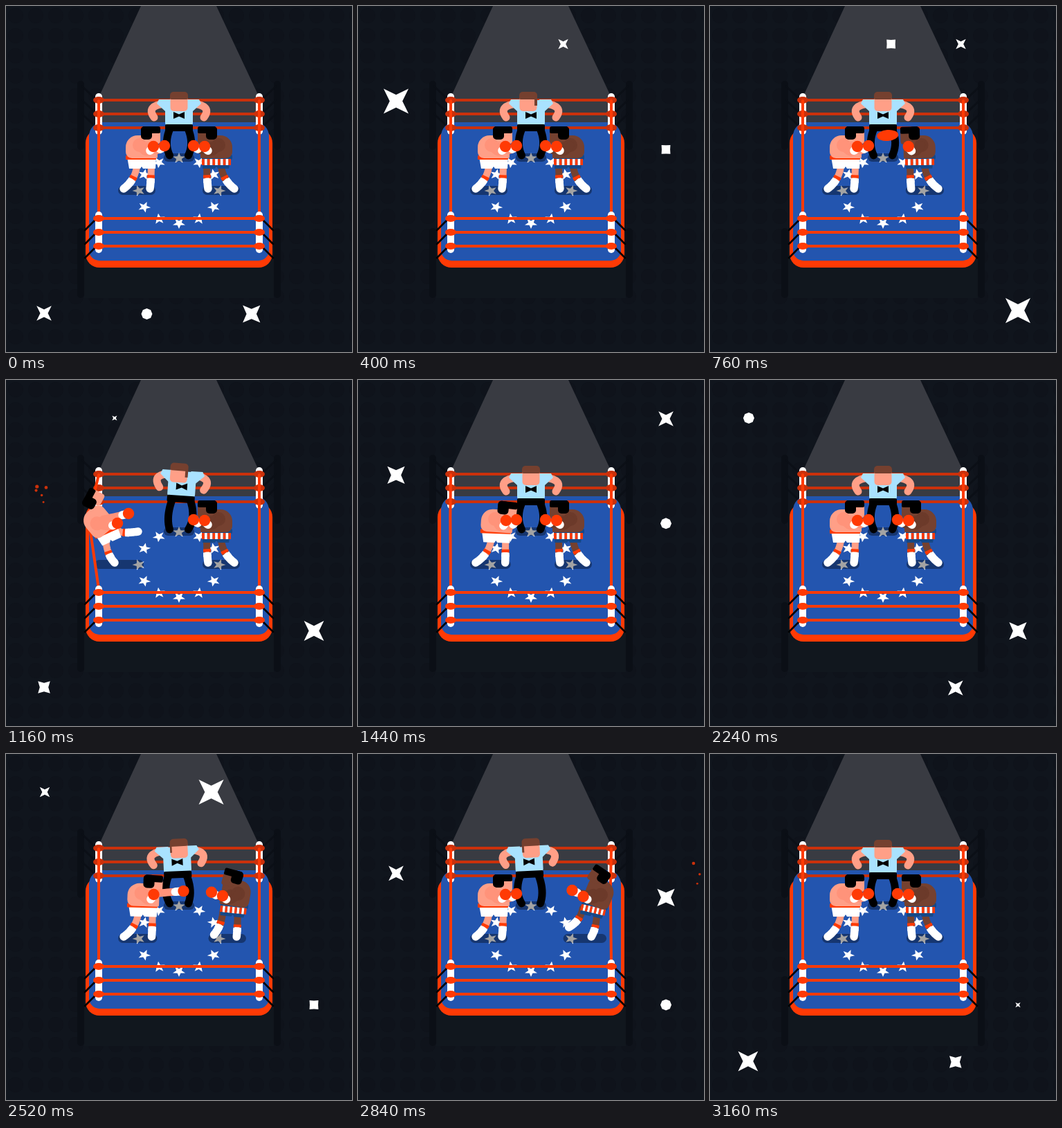
Recreate the animation shown at these times as an HTML page with a canvas. Size 500 by 500 pixels, loop 3.2 s.

```html
<!DOCTYPE html>
<html lang="en">
<head>
<meta charset="utf-8">
<title>Boxing ring</title>
<style>
html, body { margin: 0; width: 100%; height: 100%; overflow: hidden; background: #10151d; }
canvas { display: block; width: 500px; height: 500px; }
</style>
</head>
<body>
<canvas id="stage" width="500" height="500"></canvas>
<script>
const c = document.getElementById('stage').getContext('2d');
const LOOP = 3200, HALF = LOOP / 2, STEP = 40, RAD = Math.PI / 180;
const RED = '#ff3a05', DARK_RED = '#cb310b', BLACK = '#000', WHITE = '#fff';
const SHIRT = '#a9e2ff', DARK = '#0b0f16', SHADE = 'rgba(0,0,0,.36)';
const lerp = (a, b, k) => a + (b - a) * k;
// Eased 0 to 1 between two times
function ramp(t, from, to) {
  const k = Math.min(1, Math.max(0, (t - from) / (to - from)));
  return k * k * (3 - 2 * k);
}
const pulse = (t, a, b, d, e) => ramp(t, a, b) - ramp(t, d, e);

// ---------- drawing helpers ----------
function box(x, y, w, h, r, fill) {
  c.fillStyle = fill;
  c.beginPath();
  c.roundRect(x, y, w, h, r);
  c.fill();
}
function oval(x, y, rx, ry, fill, turn = 0) {
  c.fillStyle = fill;
  c.beginPath();
  c.ellipse(x, y, rx, ry, turn, 0, 7);
  c.fill();
}
function line(points, width, color, cap = 'round') {
  c.strokeStyle = color;
  c.lineWidth = width;
  c.lineCap = cap;
  c.lineJoin = 'round';
  c.beginPath();
  points.forEach(p => c.lineTo(...p));
  c.stroke();
}
function poly(points, fill) {
  c.fillStyle = fill;
  c.beginPath();
  points.forEach(p => c.lineTo(...p));
  c.fill();
}
function star(x, y, tips, outer, inner, turn, squash = 1) {
  const points = [];
  for (let i = 0; i < tips * 2; i++) {
    const a = turn + i * Math.PI / tips, r = i % 2 ? inner : outer;
    points.push([x + r * Math.cos(a), y + r * Math.sin(a) * squash]);
  }
  poly(points, WHITE);
}
// Part of a quadratic curve, from k0 to k1
function curve(p, q, r, k0, k1, width, color, cap) {
  const points = [];
  for (let i = 0; i <= 10; i++) {
    const k = lerp(k0, k1, i / 10);
    points.push([0, 1].map(n => lerp(lerp(p[n], q[n], k), lerp(q[n], r[n], k), k)));
  }
  line(points, width, color, cap);
}
function placed(x, y, degrees, draw) {
  c.save();
  c.translate(x, y);
  c.rotate(degrees * RAD);
  draw();
  c.restore();
}
function around(x, y, dx, dy, degrees) {
  const s = Math.sin(degrees * RAD), k = Math.cos(degrees * RAD);
  return [x + dx * k - dy * s, y + dx * s + dy * k];
}
function mirrored(draw) {
  c.save();
  c.translate(500, 0);
  c.scale(-1, 1);
  draw();
  c.restore();
}
function bothSides(draw) {
  draw();
  mirrored(draw);
}

// ---------- boxers, described as seen in the left corner ----------
// Each is hit in the first half of its own time u and punches in the second.
const pale = { skin: '#ff9f87', arm: '#ff937a', shorts: WHITE };
const brown = { skin: '#754130', arm: '#6c3a2a', shorts: '#164887', striped: true };

function pose(u) {
  const back = pulse(u, 800, 1040, 1160, 1400), back2 = back * back;
  const punch = pulse(u, 2340, 2400, 2400, 2640);
  const lift = pulse(u, 2280, 2350, 2400, 2580);
  const lean = punch + pulse(u, 1280, 1400, 1420, 1560);
  return {
    hip: [196 - 50 * back + 4 * lean, 220],
    tilt: 4 * lean - 40 * back2,
    width: 46 - 8 * back,
    height: 33 + 8 * Math.sqrt(back),
    head: [210 - 62 * back - 22 * back2 + 7 * lean, 186 - 14 * back + 2 * lean],
    headTilt: 7 * lean - 62 * back2,
    rearGlove: [213 - 52 * back + lean, 203 + 4 * back],
    leadGlove: [229 - 52 * back + 55 * punch, 202 - 9 * back2 - 15 * lift],
    rearFoot: [170 - 13 * back2, 264],
    leadFoot: [208 - 17 * back + 5 * lean, 264 - 45 * back2 * back2],
    smear: u > 2340 && u < 2400
  };
}
function boxerShadow(u) {
  const { hip, rearFoot, leadFoot } = pose(u);
  const left = Math.min(rearFoot[0] - 8, hip[0] - 18);
  box(left, 260, leadFoot[0] + 8 - left, 13, 6.5, SHADE);
}
function leg(hip, foot, skin) {
  const knee = [hip[0] * .85 + foot[0] * .15, (hip[1] + foot[1]) / 2 + 4];
  curve(hip, knee, foot, 0, .6, 10, skin);
  curve(hip, knee, foot, .52, .7, 11.5, WHITE, 'butt');
  curve(hip, knee, foot, .65, 1, 11.5, WHITE);
  curve(hip, knee, foot, .38, .5, 11, RED, 'butt');
}
function arm(from, glove, skin) {
  const reach = Math.hypot(glove[0] - from[0], glove[1] - from[1]);
  const elbow = [(from[0] + glove[0]) / 2, (from[1] + glove[1]) / 2 + Math.max(0, 38 - reach)];
  curve(from, elbow, glove, 0, .75, 11, skin);
  curve(from, elbow, glove, .76, .9, 12, WHITE);
  oval(...glove, 8.2, 8.2, RED);
}
function shortsOn(half, look) {
  poly([[-half, -2], [half, -2], [half - 1, 15], [2, 15], [0, 12], [-2, 15], [3 - half, 15]], look.shorts);
  if (look.striped) {
    box(-half - 2, -5, half * 2 + 2, 7, 2, look.shorts);
    const w = half * 2 / 11;
    for (let i = 0; i < 11; i++) box(-half + i * w, 1, w, 9, 0, i % 2 ? WHITE : RED);
  } else {
    box(-half - 2, -4, half * 2 + 2, 6, 1, RED);
  }
}
function boxer(u, look) {
  const p = pose(u), hipTilt = p.tilt * .6, w = p.width;
  leg(around(...p.hip, -7, 12, hipTilt), p.rearFoot, look.skin);
  leg(around(...p.hip, 14, 9, p.tilt), p.leadFoot, look.skin);
  placed(...p.hip, hipTilt, () => shortsOn(w / 2 - 2, look));
  placed(...p.hip, p.tilt, () => box(-w / 2, -p.height, w, p.height, [17, 12, 2, 9], look.skin));
  placed(...p.head, p.headTilt, () => {
    box(-5, -7, 18, 20, 4, look.skin);
    box(-15, -12, 28, 10, [5, 3, 2, 2], BLACK);
    box(-15, -12, 16, 19, 5, BLACK);
  });
  if (p.smear) oval(...p.leadGlove, 15.5, 8, RED, .08);
  else arm(around(...p.hip, 8, -18, p.tilt), p.leadGlove, look.arm);
  const shoulder = around(...p.hip, -3, -19, p.tilt);
  oval(...shoulder, 10, 10, look.arm);
  arm(shoulder, p.rearGlove, look.arm);
}

// Drops thrown off when a boxer lands in the ropes
function drops(u) {
  const k = (u - 1160) / STEP, spread = 1 + k * .2;
  if (k < -2 || k > 4) return;
  for (let i = 0; i < 5; i++) {
    const r = 2.6 - i * .28;
    oval(50 - 23 * k + 8 * Math.cos(i * 2.4 + 4) * spread, 154 + k + i * i * 1.4 * spread, r, r, DARK_RED);
  }
}
function sideRope(u) {
  const late = Math.max(0, u - 1160);
  const push = 15 * ramp(u, 1000, 1080) * Math.exp(-late / 90) * Math.cos(late / 45);
  line([[134, 137], [134 - push, 198], [134, 302], [134, 347]], 4, RED);
}

// ---------- referee: glances at one boxer, then dodges the punch ----------
function referee(t) {
  const side = t < HALF ? 1 : -1, u = t % HALF;
  const dodge = pulse(u, 800, 1000, 1160, 1400);
  const glance = pulse(u, 160, 280, 480, 600);
  const x = 3 * side * dodge, y = -4 * dodge * dodge;
  const look = -4 * side * (glance + dodge);
  for (const s of [-1, 1])
    curve([250 + s * 13 + x, 177 + y], [250 + s * 22 + x, 198], [250 + s * 13.5, 216], 0, 1, 11, BLACK);
  placed(250 + x, 171 + y, x * 1.3, () => {
    c.translate(-250, -171);
    bothSides(() => {
      curve([224, 142], [203 - y, 146], [214 - y, 161], 0, 1, 11, '#ff9f87');
      poly([[221, 135], [238, 135], [238, 152], [230, 152], [218, 141]], SHIRT);
    });
    box(230, 136, 40, 36, 3, SHIRT);
    box(230, 171, 40, 10, 2, BLACK);
    poly([[242, 153], [250, 156.5], [258, 153], [258, 163], [250, 159.5], [242, 163]], BLACK);
  });
  placed(250 + x + look, 151 + y, x * 1.5, () => {
    box(-12.5, -19, 25, 20, [0, 0, 5, 5], '#ff9f87');
    box(-13, -27, 26, 11, [5, 5, 2, 2], '#75402f');
    const burn = Math.abs(look);
    box(look < 0 ? 13 - burn : -13, -18, burn, 11, 0, '#75402f');
  });
}

// ---------- camera flashes, evenly timed on a square round the ring ----------
// Whole part: top, right, bottom or left side; fraction: how far along it, clockwise
const spots = [
  2.62, .62, 3.79, 1.39, .79, 1.99, .53, .26, 1.79, 3, 1, 3.79, 1.39, 2.62,
  2.53, 3.7, .9, 2.23, 1.79, 0, .62, 1.79, 3.7, 1.39, 1.79, 3, 2.23
];
function flash(spot, i, t) {
  const start = Math.round(i * LOOP / spots.length / STEP) * STEP;
  const age = (t - start + LOOP) % LOOP / STEP;
  if (age > 8) return;
  const tip = age < 5 ? 8 + 17.5 * (age / 4) ** 2 : 25.5 * (9 - age) / 5;
  const core = tip * Math.max(.36, 1 / (1 + age / 2));
  const [x, y] = around(250, 250, 388 * (spot % 1) - 194, -195, 90 * Math.floor(spot));
  star(x, y, 4, tip, core, 45 * RAD);
}

// ---------- ring ----------
function backdrop() {
  box(0, 0, 500, 500, 0, '#10151d');
  for (let y = 14; y < 500; y += 29)
    for (let x = 14; x < 510; x += 29) oval(x, y, 11, 11, '#0f131b');
  box(113, 350, 274, 72, 0, '#11171e');
  poly([[195, 0], [304, 0], [366, 132], [366, 190], [134, 190], [134, 132]], '#393b42');
  bothSides(() => {
    box(103, 108, 10, 100, 5, DARK);
    box(103, 321, 10, 101, 5, DARK);
    for (const y of [136, 156, 176]) line([[131, y], [110, y - 20]], 2.5, DARK);
  });
}
function floor() {
  box(115, 178, 270, 200, 20, RED);
  box(120, 168, 260, 200, [20, 20, 15, 15], '#2355af');
  for (let i = 0; i < 12; i++) {
    const a = i * 30 * RAD;
    star(250 + 58 * Math.cos(a), 267 + 47 * Math.sin(a), 5, 9.5, 4, a, .85);
  }
}
function ropesAndPosts(top, color) {
  bothSides(() => box(129, top - 10, 10, 60, 5, WHITE));
  for (let y = top; y <= top + 40; y += 20) {
    line([[134, y], [366, y]], 4, color);
    bothSides(() => oval(134, y, 8, 5, color));
  }
}

function render(t) {
  const other = (t + HALF) % LOOP;
  backdrop();
  floor();
  ropesAndPosts(136, DARK_RED);
  box(228, 213, 44, 12, 6, SHADE);
  boxerShadow(t);
  mirrored(() => boxerShadow(other));
  sideRope(t);
  mirrored(() => sideRope(other));
  referee(t);
  const left = () => boxer(t, pale);
  const right = () => mirrored(() => boxer(other, brown));
  (t < HALF ? [left, right] : [right, left]).forEach(draw => draw());
  bothSides(() => {
    for (const y of [308, 328, 348]) line([[130, y], [114, y + 16]], 2.5, BLACK);
  });
  ropesAndPosts(307, RED);
  drops(t);
  mirrored(() => drops(other));
  spots.forEach((spot, i) => flash(spot, i, t));
}

const began = performance.now();
function tick() {
  const t = (performance.now() - began) % LOOP;
  render(Math.floor(t / STEP) * STEP);
  requestAnimationFrame(tick);
}
tick();
</script>
</body>
</html>
```
